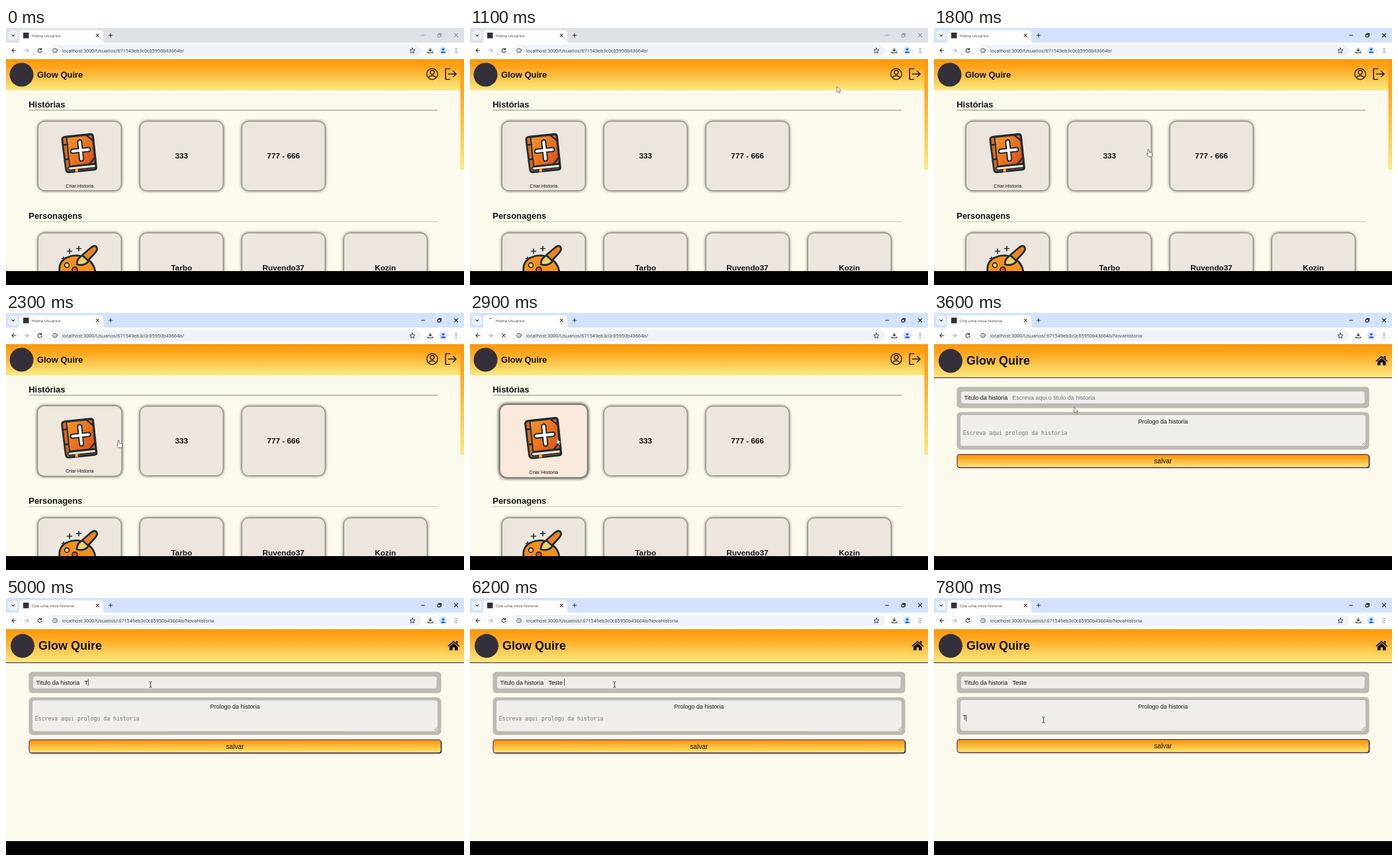
Animation of 692x388 px, one loop 8 s. Source, as an HTML page:

```html
<!DOCTYPE html>
<html lang="pt">
<head>
<meta charset="utf-8">
<title>Nova historia</title>
<style>
  html, body { margin: 0; width: 100%; height: 100%; overflow: hidden; background: #000; }
  svg { display: block; width: 692px; height: 388px; }
  text { font-family: "Liberation Sans", Arial, sans-serif; fill: #111; white-space: pre; }
  .ui { font-family: "Open Sans", "Noto Sans", sans-serif; fill: #333639; }
  .mono { font-family: "DejaVu Sans Mono", monospace; font-size: 8.2px; }
  .bold { font-weight: 700; }
  .mid { text-anchor: middle; }
  .hint { fill: #757575; }
  .line { fill: none; stroke: #333; stroke-width: 1.1; stroke-linecap: round; stroke-linejoin: round; }
  .ink { stroke: #1d2d35; stroke-width: 2.8; stroke-linejoin: round; stroke-linecap: round; }
</style>
</head>
<body>
<svg viewBox="0 0 692 388">
  <defs>
    <linearGradient id="sun" x2="0" y2="1">
      <stop offset="0" stop-color="#ff970a"/>
      <stop offset=".25" stop-color="#fea51c"/>
      <stop offset="1" stop-color="#f9ea80"/>
    </linearGradient>
    <linearGradient id="cover" x2="1" y2="1">
      <stop offset="0" stop-color="#f5962a"/>
      <stop offset="1" stop-color="#dc5016"/>
    </linearGradient>
    <filter id="soft" x="-20%" y="-20%" width="140%" height="140%">
      <feGaussianBlur stdDeviation="2"/>
    </filter>
  </defs>

  <rect width="692" height="388" fill="#fcfaec"/>

  <!-- Browser -->
  <rect id="strip" width="692" height="23"/>
  <rect x="3.5" y="4" width="14.5" height="14.5" rx="4.5" fill="#eef3fc"/>
  <path class="line" d="M8.800 10.200l2.100 2.100 2.100-2.100"/>
  <path d="M16 22.500q4 0 4-4V8q0-4.500 4.500-4.500H142.500q4.500 0 4.500 4.500v10.500q0 4 4 4z" fill="#fff"/>
  <rect y="22" width="692" height="25" fill="#fff"/>
  <rect id="favicon" x="26" y="7" width="8.500" height="8.500" fill="#33303a"/>
  <path id="spinner" class="line" d="M30.200 7.800a3.600 3.600 0 0 1 2 .6"/>
  <text id="tab" class="ui" x="39" y="13.700" font-size="6.050"></text>
  <path class="line" d="M136.300 9.200l4 4m0-4l-4 4M155.200 11h5.600m-2.800-2.800v5.600"/>
  <g id="controls" class="line">
    <path d="M627.600 11h5M677.600 8.500l5 5m0-5l-5 5"/>
    <rect x="652.300" y="9.600" width="4" height="4" rx=".6"/>
    <path d="M653.800 8.400h3.700v3.700"/>
  </g>
  <path class="line" d="M15 34H9m2.600-2.700L9 34l2.600 2.700"/>
  <path class="line" stroke-opacity=".4" d="M28 34h6m-2.600-2.700L34 34l-2.600 2.700"/>
  <path id="reload" class="line" d="M53.300 32.200a2.900 2.900 0 1 0 .6 2.400M53.700 30.500v2h-2"/>
  <path id="stop" class="line" d="M48.700 31.700l4.600 4.600m0-4.600l-4.600 4.600"/>
  <rect x="65" y="25.500" width="562" height="17" rx="8.500" fill="#eef2f9"/>
  <circle cx="74" cy="34" r="6.300" fill="#fff"/>
  <circle class="line" cx="74" cy="34" r="3.300" style="stroke-width:.9"/>
  <path class="line" d="M74 33.800v1.700m0-3.300v.1" style="stroke-width:.9"/>
  <text id="url" class="ui" x="85" y="36.500" font-size="7.200"></text>
  <path class="line" style="stroke-width:.9" d="M614 30.200l1.200 2.600 2.800.3-2.100 1.900.6 2.800-2.500-1.400-2.500 1.400.6-2.800-2.100-1.900 2.800-.3z"/>
  <path class="line" d="M641 30.300v4.400m-2-1.900l2 2 2-2M637.500 35.800v1.700h7v-1.700"/>
  <circle cx="660.500" cy="34" r="6" fill="#d2e3fc"/>
  <circle cx="660.500" cy="32.300" r="1.800" fill="#1a5fd0"/>
  <path d="M657 37.800q0-2.600 3.500-2.600t3.500 2.600z" fill="#1a5fd0"/>
  <path class="line" d="M680 31v0m0 3v0m0 3v0" style="stroke-width:1.600"/>

  <!-- Home -->
  <g id="home">
    <rect y="47" width="692" height="47" fill="url(#sun)"/>
    <rect x="686.500" y="47" width="5.500" height="167" fill="url(#sun)"/>
    <circle cx="23.500" cy="70.500" r="18" fill="#33303a"/>
    <text class="bold" x="47" y="74.800" font-size="13">Glow Quire</text>
    <g class="line" style="stroke:#2a2013;stroke-width:1.400">
      <circle cx="644" cy="69.500" r="8.200"/>
      <circle cx="644" cy="67" r="3"/>
      <path d="M638.500 75.200q1.200-3.200 5.500-3.200t5.500 3.200"/>
      <path d="M670.500 61.500h-6.300v16h6.300M668.500 69.500h11.500m-4.200-4.200l4.200 4.200-4.200 4.200" style="stroke-width:1.700"/>
    </g>
    <text class="bold" x="34.300" y="119.700" font-size="12.900">Histórias</text>
    <path d="M34.500 124.100H652" stroke="#85857d"/>
    <text class="bold" x="34.300" y="288.200" font-size="12.900">Personagens</text>
    <path d="M34.500 292.300H652" stroke="#c6c5bb"/>
    <g id="cards"></g>
  </g>

  <!-- New story form -->
  <g id="form">
    <rect y="47" width="692" height="50" fill="url(#sun)"/>
    <path d="M0 97.700H692" stroke="#5b3a55" stroke-width="1.300"/>
    <circle cx="25" cy="72.300" r="18" fill="#33303a"/>
    <text class="bold" x="49" y="78.300" font-size="18">Glow Quire</text>
    <path d="M667.300 72.300L676.300 64.600l9 7.700-1.100 1.300-7.900-6.700-7.900 6.700zM670 73.600l6.300-5.300 6.300 5.300V79h-4.600v-4.600h-3.400V79H670zM680 65h2.500v4.200l-2.500-2.100z" fill="#111"/>
    <rect x="34.500" y="111.500" width="623" height="32" rx="5" fill="#bcbab3"/>
    <rect x="41" y="118.500" width="609.500" height="18" rx="3" fill="#f0eeeb"/>
    <text x="45.500" y="130.600" font-size="9">Titulo da historia</text>
    <text id="titleHint" class="hint" x="118.300" y="130.600" font-size="9">Escreva aqui o titulo da historia</text>
    <text id="title" x="118.600" y="130.600" font-size="9"></text>
    <rect id="titleCaret" y="122.300" width=".8" height="10" fill="#222"/>
    <g id="lower">
      <rect x="34.500" y="149.500" width="623" height="56.700" rx="6" fill="#bcbab3"/>
      <rect x="40" y="154" width="612" height="46.500" rx="4" fill="#f0eeeb"/>
      <text class="mid" x="346" y="166.500" font-size="9">Prologo da historia</text>
      <text id="bodyHint" class="mono hint" x="43.800" y="184.400">Escreva aqui prologo da historia</text>
      <text id="body" class="mono" x="43.800" y="184.400"></text>
      <rect id="bodyCaret" y="176.500" width=".8" height="10" fill="#222"/>
      <path d="M646.800 199.300l4.400-4.400m-1.900 4.400l1.900-1.900" stroke="#666" stroke-width=".7"/>
      <rect x="35.500" y="214.300" width="623" height="20" rx="4" fill="#4c2c78"/>
      <rect x="35" y="213.600" width="622.300" height="19.700" rx="4" fill="url(#sun)" stroke="#563052" stroke-width="1.200"/>
      <text class="mid" x="346" y="227" font-size="10.100">salvar</text>
    </g>
  </g>

  <!-- Pointers, hot spot at 0,0 -->
  <path id="arrow" d="M0 0v8.600l2-1.800 1.400 3.200 1.500-.7-1.400-3h2.700z" fill="#fff" stroke="#555" stroke-width=".7"/>
  <path id="hand" d="M-1 .8q1-1.300 2 0V4.400l3.700.8q1.200.4 1 1.800l-.8 4.500H.2L-3 7.200q.4-1.200 2 .2z" fill="#fff" stroke="#444" stroke-width=".7"/>
  <path id="beam" d="M-2-4.200q1.600 0 2 .7.400-.7 2-.7M0-3.600V3.800M-2 4.400q1.600 0 2-.7.400.7 2 .7" fill="none" stroke="#222" stroke-width=".9"/>

  <rect y="367" width="692" height="21"/>
</svg>

<script>
const LOOP = 8000, STEP = 100;
const PAGE_AT = 3200, FOCUS_AT = 4100, BODY_AT = 7200;
const id = name => document.getElementById(name);
const show = (name, on) => { id(name).style.display = on ? "" : "none"; };
const ramp = (t, a, b) => Math.min(1, Math.max(0, (t - a) / (b - a)));

// time, x, y, pointer shape
const pointer = [
  [400, 655, 358, "arrow"], [1200, 540, 50, "arrow"], [1300, 520, 14, "arrow"],
  [1500, 420, 60, "arrow"], [1700, 420, 60, "arrow"], [1800, 324, 183, "hand"],
  [2100, 188, 193, "arrow"], [2200, 188, 193, "arrow"], [2300, 170, 192, "hand"],
  [2700, 131, 189.5, "hand"], [2900, 131, 189.5, "arrow"], [3100, 136, 187, "arrow"],
  [3600, 211.7, 142.3, "arrow"], [3700, 213, 140.5, "arrow"], [3800, 215, 135, "beam"],
  [4100, 218.3, 130.6, "beam"], [6600, 218.3, 130.6, "beam"],
  [7200, 165.3, 184, "beam"], [LOOP, 165.3, 184, "beam"]
];
const typing = [[5000, "T"], [5300, "Te"], [5500, "Tes"], [5600, "Test"], [5700, "Teste"], [6200, "Teste "]];
const bodyTyping = [[7700, "T"]];

const book = `<g transform="translate(111 188) rotate(-6)" class="ink">
  <path d="M-24-21q0-5 5-5H19q4 0 4 4V25q0 3-3 3H-18q-5 0-5-5z" fill="#dd681c"/>
  <path d="M-18 20H22v5H-18q-3-2.500 0-5z" fill="#fbe9cf" stroke-width="1.800"/>
  <path d="M-17-25H19q3 0 3 3V19H-17z" fill="url(#cover)" stroke-width="2"/>
  <path d="M13-25l9 9M13 19l9-9M-23-14h6M-23 8h6" fill="none" stroke-width="2.400"/>
  <path d="M-9 24v6l2-2 2 2v-6z" fill="#f7b64a" stroke="none"/>
  <path d="M2-16V10M-10-3H14" stroke-width="8"/>
  <path d="M2-16V10M-10-3H14" stroke="#fff" stroke-width="4"/></g>`;

const sparkle = (x, y, r) => `<path d="M${x - r} ${y}h${2 * r}M${x} ${y - r}v${2 * r}" class="ink" style="stroke-width:1.6"/>`;
const palette = `<g class="ink">
  <path d="M82 374q-5-20 9-27 16-8 32 2 13 9 12 25z" fill="#f6901e"/>
  <circle cx="92" cy="358" r="3.500" fill="#fbd06a" stroke-width="1.800"/>
  <circle cx="104" cy="365" r="4" fill="#e3561b" stroke-width="1.800"/>
  <path d="M107 357q0-10 9-14l9 8q-5 9-18 6z" fill="#fbd06a"/>
  <path d="M115 343l14-12q6-4 8 0 2 3-2 8l-11 12z" fill="#f28322"/></g>`
  + sparkle(110, 333, 3.5) + sparkle(96, 337, 3.5) + sparkle(87, 348, 2.5);

function card(x, y, label, art) {
  const box = `x="${x}" y="${y}" width="125.500" height="104.500" rx="10"`;
  const text = art
    ? `${art}<text class="mid" x="${x + 62.7}" y="${y + 99.8}" font-size="7.200">${label}</text>`
    : `<text class="mid bold" x="${x + 62.7}" y="${y + 56}" font-size="11.750">${label}</text>`;
  return `<g data-cx="${x + 62.75}" data-cy="${y + 52.25}">
    <rect class="shade" ${box} fill="#45483d" stroke="#45483d" filter="url(#soft)"/>
    <rect class="face" ${box} stroke="#85877b" stroke-width=".8"/>${text}</g>`;
}

const columns = [48.5, 202.5, 356.5, 510.5];
id("cards").innerHTML =
  ["Criar Historia", "333", "777 - 666"].map((s, i) => card(columns[i], 141, s, i ? "" : book)).join("") +
  ["Criar Personagem", "Tarbo", "Ruvendo37", "Kozin"].map((s, i) => card(columns[i], 309.5, s, i ? "" : palette)).join("");
const cards = [...id("cards").children];

function hover(el, amount) {
  const { cx, cy } = el.dataset;
  el.setAttribute("transform", `translate(${cx} ${cy}) scale(${1 + .05 * amount}) translate(${-cx} ${-cy})`);
  el.querySelector(".face").setAttribute("fill", `rgb(${237 + 12 * amount},${230 + 4 * amount},${222 - 2 * amount})`);
  el.querySelector(".shade").setAttribute("stroke-width", 1 + 3 * amount);
}

function drawPointer(t) {
  let shape = "", x = 0, y = 0;
  for (let i = 0; i < pointer.length - 1; i++) {
    const [a, ax, ay, kind] = pointer[i], [b, bx, by] = pointer[i + 1];
    if (t < a || t >= b) continue;
    const k = (t - a) / (b - a);
    shape = kind;
    x = ax + (bx - ax) * k;
    y = ay + (by - ay) * k;
  }
  for (const name of ["arrow", "hand", "beam"]) show(name, name === shape);
  if (shape) id(shape).setAttribute("transform", `translate(${x} ${y})`);
}

// Typed text with a caret that blinks every half second after the last key.
function drawField(name, t, keys, from, to) {
  let text = "", last = from;
  for (const [at, value] of keys) if (t >= at) { text = value; last = at; }
  const el = id(name);
  if (el.textContent !== text) el.textContent = text;
  show(name + "Hint", !text);
  show(name + "Caret", t >= from && t < to && (t - last) % 1000 < 500);
  const width = text ? el.getComputedTextLength() : 0;
  id(name + "Caret").setAttribute("x", +el.getAttribute("x") + width - .3);
}

function draw(time) {
  const t = Math.floor(time % LOOP / STEP) * STEP;
  const onForm = t >= PAGE_AT, loading = t >= 2900 && t < PAGE_AT + 100, active = t >= 1300;

  id("strip").setAttribute("fill", active ? "#d3e3fd" : "#dee1e6");
  id("controls").style.stroke = active ? "#222" : "#999";
  id("tab").textContent = onForm ? "Crie uma nova historia" : "Home Usuarios";
  id("url").textContent = "localhost:3000/Usuarios/" + (onForm ? ":" : "") +
    "671549eb3c0c65950b43664b/" + (onForm ? "NovaHistoria" : "");
  show("favicon", !loading);
  show("spinner", loading);
  id("spinner").setAttribute("transform", `rotate(${(t - 2900) * .36} 30.2 11.3)`);
  show("reload", !loading);
  show("stop", loading);
  show("home", !onForm);
  show("form", onForm);

  if (onForm) {
    const nudge = t >= FOCUS_AT && t < BODY_AT ? .6 : 0;
    id("lower").setAttribute("transform", `translate(0 ${nudge})`);
    drawField("title", t, typing, FOCUS_AT, BODY_AT);
    drawField("body", t, bodyTyping, BODY_AT, LOOP);
  } else {
    // The pointer crosses the second card briefly, then settles on the first.
    const amounts = [ramp(t, 2200, 2600), .5 * (ramp(t, 1800, 1900) - ramp(t, 2000, 2100))];
    cards.forEach((el, i) => hover(el, amounts[i] || 0));
  }
  drawPointer(t);
}

const start = performance.now();
(function tick() {
  draw(performance.now() - start);
  requestAnimationFrame(tick);
})();
</script>
</body>
</html>
```
